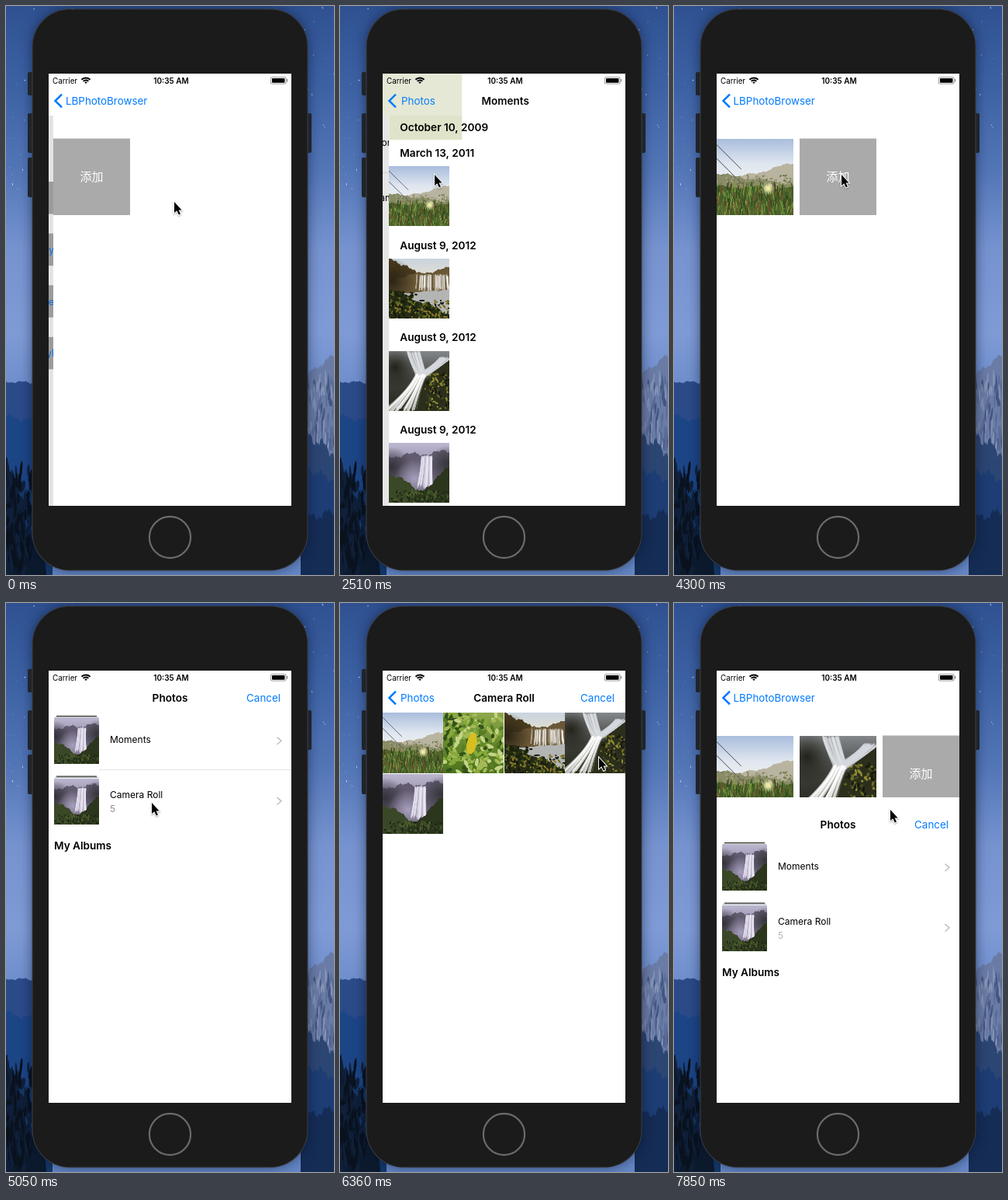
Animation, 423 px wide and 732 px high, one loop 8000 ms. Source, as an HTML page with a canvas:

```html
<!DOCTYPE html>
<html lang="en">
<head>
<meta charset="utf-8">
<title>Photo picker</title>
<style>
  html, body { margin: 0; width: 100%; height: 100%; overflow: hidden; background: #2f5191; }
  canvas { display: block; }
</style>
</head>
<body>
<canvas id="stage" width="423" height="732"></canvas>
<script>
// All animation times below are counted in beats: the screen refreshes once per beat.
const LOOP = 8000, BEAT = 148, LAST_BEAT = 53;
const LEFT = 55, TOP = 87, WIDTH = 313, HEIGHT = 556, NAV_BOTTOM = 141;
const BLUE = '#007aff';
const ctx = document.getElementById('stage').getContext('2d');

const VISITS = [
  { up: 8, rise: 231, push: 15, page: drawMoments, title: 'Moments', down: 21 },
  { up: 30, rise: 285, push: 37, page: drawRoll, title: 'Camera Roll', cancel: true, down: 44 },
  { up: 53, rise: 163 }
];
const POINTER_STOPS = [
  { at: 0, x: 217, y: 252 }, { at: 3, x: 116, y: 236 }, { at: 11, x: 122, y: 242 },
  { at: 14, x: 122, y: 217 }, { at: 23, x: 266, y: 213 }, { at: 27, x: 216, y: 217 },
  { at: 34, x: 188, y: 257 }, { at: 43, x: 334, y: 199 }, { at: 53, x: 279, y: 266 }
];

// Spring-like settling: a quarter of the distance is left after each beat.
function settle(beat, start, distance) {
  const rest = distance * .25 ** (beat - start);
  return rest < 1.2 ? 0 : rest;
}

const mix = (a, b, k) => a + (b - a) * k;

function seeded(seed) {
  return () => (seed = (seed * 16807) % 2147483647) / 2147483647;
}

// Scenery is painted on a 100 by 100 field.
function makePainter(c, seed) {
  const random = seeded(seed);
  const pick = list => list[random() * list.length | 0];
  return {
    sky(...colors) {
      const g = c.createLinearGradient(0, 0, 0, 100);
      colors.forEach((color, i) => g.addColorStop(i / (colors.length - 1), color));
      c.fillStyle = g;
      c.fillRect(0, 0, 100, 100);
    },
    ridge(color, left, right, rough) {
      const phase = random() * 6;
      c.fillStyle = color;
      c.beginPath();
      c.moveTo(0, 100);
      for (let x = 0; x <= 100; x += 2) {
        const bump = Math.sin(x * .13 + phase) + Math.sin(x * .4 + phase * 2) / 2 + Math.sin(x + phase) / 3;
        c.lineTo(x, mix(left, right, x / 100) + rough * bump);
      }
      c.lineTo(100, 100);
      c.fill();
    },
    glow(color, x, y, r) {
      const g = c.createRadialGradient(x, y, 0, x, y, r);
      g.addColorStop(0, color);
      g.addColorStop(1, color + '00');
      c.fillStyle = g;
      c.fillRect(0, 0, 100, 100);
    },
    speckle(colors, count, x, y, w, h, size) {
      for (let i = 0; i < count; i++) {
        c.fillStyle = pick(colors);
        c.beginPath();
        c.ellipse(x + random() * w, y + random() * h, size * (.4 + random()), size * .5, random() * 3, 0, 7);
        c.fill();
      }
    },
    blades(colors, count, y, h, length) {
      c.lineWidth = 1;
      for (let i = 0; i < count; i++) {
        const x = random() * 104 - 2, foot = y + (i / count) * h;
        c.strokeStyle = pick(colors);
        c.beginPath();
        c.moveTo(x, foot + length);
        c.lineTo(x + random() * 8 - 4, foot);
        c.stroke();
      }
    },
    water(color, x1, y1, w1, x2, y2, w2) {
      c.lineWidth = 2;
      for (let i = 0; i < 50; i++) {
        const k = random() - .5;
        c.strokeStyle = color;
        c.globalAlpha = .15 + random() * .5;
        c.beginPath();
        c.moveTo(x1 + k * w1, y1 + random() * 4);
        c.quadraticCurveTo(mix(x1, x2, .3) + k * w1, mix(y1, y2, .4), x2 + k * w2, y2 - random() * 8);
        c.stroke();
      }
      c.globalAlpha = 1;
    }
  };
}

function makePhoto(seed, paint) {
  const photo = document.createElement('canvas');
  photo.width = photo.height = 200;
  const c = photo.getContext('2d');
  c.scale(2, 2);
  paint(makePainter(c, seed), c);
  return photo;
}

const grass = makePhoto(11, (p, c) => {
  p.sky('#a9bddd', '#e0e7f0', '#f4f4f2', '#f4f4f2');
  p.ridge('#b9b4a0', 58, 32, 1.5);
  p.ridge('#8b8d68', 46, 60, 1.5);
  p.speckle(['#6f7a4a', '#a8a587', '#888a63'], 120, 0, 48, 100, 16, 2);
  p.ridge('#4b652b', 63, 64, 1.5);
  p.blades(['#86a048', '#2f471c', '#7c4a34', '#5c7c34', '#41592a'], 320, 56, 40, 12);
  c.strokeStyle = '#55585c';
  c.lineWidth = .8;
  for (const y of [8, 26]) {
    c.beginPath();
    c.moveTo(0, y);
    c.lineTo(32, y + 32);
    c.stroke();
  }
  p.glow('#fffbd0', 67, 65, 9);
  p.glow('#f4ee9c', 67, 65, 6);
});

const leaves = makePhoto(23, (p, c) => {
  p.sky('#8fa84d', '#668b2d', '#4d711f');
  p.speckle(['#86aa3a', '#33521a', '#c3d486', '#587d25', '#a4ba56'], 200, 0, 0, 100, 100, 6);
  c.fillStyle = '#d7bf22';
  c.beginPath();
  c.ellipse(47, 51, 8, 18, .2, 0, 7);
  c.fill();
});

const sunset = makePhoto(37, p => {
  p.sky('#c9d4df', '#f3e6c8', '#f3e6c8');
  p.ridge('#4b3c20', -4, 60, 3);
  p.ridge('#6a5736', 34, 16, 2);
  p.glow('#2a2413', 5, 38, 38);
  p.water('#ffffff', 72, 26, 52, 72, 56, 56);
  p.ridge('#b3b5b4', 60, 52, .6);
  p.ridge('#262d14', 50, 92, 3);
  p.speckle(['#6f7020', '#14180c', '#414d1c', '#8b7530', '#1d2411'], 150, 0, 70, 100, 32, 3);
  p.speckle(['#5d651f', '#1a200f'], 40, 0, 56, 45, 20, 3);
});

const stream = makePhoto(51, p => {
  p.sky('#85888c', '#3d3f39', '#25271b');
  p.glow('#23231a', 10, 28, 36);
  p.ridge('#2c2f1b', 96, 14, 3);
  p.speckle(['#6d6c22', '#181a10', '#454a20', '#8e8a35', '#2b2e1c'], 130, 58, 32, 44, 70, 3);
  p.water('#dfe2e6', 40, 0, 22, 54, 46, 16);
  p.water('#d5d9de', 92, 10, 16, 56, 44, 12);
  p.water('#ffffff', 53, 38, 18, 18, 104, 58);
});

const purple = makePhoto(83, p => {
  p.sky('#bdb7d0', '#8d85a2', '#6b6478');
  p.ridge('#635c70', 22, 14, 3);
  p.glow('#35323c', 4, 40, 34);
  p.glow('#35363a', 96, 34, 30);
  p.glow('#a79fbc', 42, 60, 34);
  p.water('#ece7f6', 63, 20, 18, 60, 76, 26);
  p.ridge('#3a4827', 50, 104, 3);
  p.ridge('#2b361d', 126, 40, 3);
  p.speckle(['#4d5e2d', '#1f2815', '#394926'], 110, 0, 80, 100, 20, 3);
});

function rect(color, x, y, w, h) {
  ctx.fillStyle = color;
  ctx.fillRect(x, y, w, h);
}

function rounded(color, x, y, w, h, r) {
  ctx.fillStyle = color;
  ctx.beginPath();
  ctx.roundRect(x, y, w, h, r);
  ctx.fill();
}

// y is the middle of the capitals.
function text(str, x, y, size, { color = '#000', weight = 400, align = 'left' } = {}) {
  ctx.font = `${weight} ${size}px Inter, "Noto Sans CJK SC", "Noto Sans CJK", sans-serif`;
  ctx.fillStyle = color;
  ctx.textAlign = align;
  ctx.fillText(str, x, y + size * .36);
}

const heading = (str, x, y, align) => text(str, x, y, 13.6, { weight: 600, align });

function chevron(x, y, dx, dy, color, width) {
  ctx.strokeStyle = color;
  ctx.lineWidth = width;
  ctx.beginPath();
  ctx.moveTo(x + dx, y - dy);
  ctx.lineTo(x, y);
  ctx.lineTo(x + dx, y + dy);
  ctx.stroke();
}

function clipTo(x, y, w, h, draw) {
  ctx.save();
  ctx.beginPath();
  ctx.rect(x, y, w, h);
  ctx.clip();
  draw();
  ctx.restore();
}

function shifted(dx, dy, draw) {
  ctx.save();
  ctx.translate(dx, dy);
  draw();
  ctx.restore();
}

function scenery(x, y, w, h, seed, paint) {
  shifted(x, y, () => {
    ctx.scale(w / 100, h / 100);
    paint(makePainter(ctx, seed));
  });
}

function drawDesktop() {
  scenery(0, 0, 423, 732, 97, p => {
    p.sky('#2f5191', '#3d62a4', '#5275b6', '#7693d0', '#7f9bd6', '#6587c6', '#6587c6', '#6587c6');
    p.speckle(['#dfe8ff', '#8ca6d8', '#5f80bd'], 200, 0, 0, 100, 34, .18);
  });
  scenery(0, 470, 60, 262, 5, p => {
    p.ridge('#2b4a88', 5, 6, .5);
    p.ridge('#1c4586', 22, 26, 1);
    p.ridge('#143868', 50, 70, 2);
    p.ridge('#0c1a2e', 46, 104, 4);
    p.speckle(['#0a121e', '#10203a'], 120, 0, 48, 56, 52, 5);
  });
  scenery(380, 440, 43, 292, 19, p => {
    p.ridge('#6a7ca6', 14, 3, .8);
    p.speckle(['#8494b6', '#43557f', '#596b97'], 90, 15, 14, 85, 30, 4);
    p.ridge('#2c4673', 36, 46, 2);
    p.ridge('#1d3d74', 52, 58, 1.5);
    p.ridge('#152c54', 76, 72, 1.5);
  });
}

function drawPhone() {
  ctx.save();
  ctx.shadowColor = 'rgba(5,15,40,.55)';
  ctx.shadowBlur = 16;
  rounded('#1c1c1c', 34, 4, 355, 722, 48);
  ctx.restore();
  rounded('#20242a', 28, 85, 7, 30, 2);
  rounded('#20242a', 28, 195, 7, 51, 2);
  for (const x of [28, 387]) rounded('#20242a', x, 138, 7, 51, 2);
  rounded('#3a3f45', 33.5, 3.5, 356, 723, 48.5);
  rounded('#1b1b1b', 34.5, 4.5, 354, 721, 47.5);
  ctx.strokeStyle = '#6b6b6b';
  ctx.lineWidth = 2.2;
  ctx.beginPath();
  ctx.arc(211.5, 683.5, 26.6, 0, 7);
  ctx.stroke();
}

function drawStatus() {
  text('Carrier', 60, 96, 9.8);
  text('10:35 AM', 213, 96, 10, { weight: 600, align: 'center' });
  ctx.strokeStyle = '#000';
  ctx.lineWidth = 2;
  for (const r of [1.3, 4.5, 7.6]) {
    ctx.beginPath();
    ctx.arc(103, 100, r, -Math.PI * .76, -Math.PI * .24);
    ctx.stroke();
  }
  rounded('#888', 341, 91.2, 20.5, 9.4, 2.4);
  rounded('#fff', 341.8, 92, 18.9, 7.8, 1.8);
  rounded('#000', 343, 93, 16.5, 5.8, 1);
  rect('#888', 362, 94, 1.2, 3.5);
}

function drawBack(label, x) {
  chevron(63.5, 122, 8.5, 8.3, BLUE, 2.5);
  text(label, x, 122, 13.4, { color: BLUE });
}

// The home page, with the page it slid over still showing at the left.
function drawHome(beat) {
  const off = settle(beat, 0, 6);
  rect('#fff', LEFT, TOP, WIDTH, HEIGHT);
  clipTo(LEFT, NAV_BOTTOM, off, HEIGHT, () => {
    rect('#e4e4e4', LEFT, NAV_BOTTOM, off, HEIGHT);
    ['', 'ty', 'e', 'yl'].forEach((label, i) => {
      const y = 226 + i * 66.6;
      rect('#9c9c9c', LEFT, y, off, 41.5);
      text(label, 62, y + 21, 12.5, { color: '#0a6fe0', align: 'right' });
    });
  });
  drawBack('LBPhotoBrowser', 76.5 + off / 12);
  const picked = [grass, stream].slice(0, VISITS.filter(v => beat >= v.down + 4).length);
  picked.forEach((photo, i) => ctx.drawImage(photo, LEFT + i * 107, 170.5, 99, 98.5));
  const x = LEFT + picked.length * 107 + off;
  rect('#aaa', x, 170.5, 99, 98.5);
  text('添加', x + 49.5, 220, 15, { color: '#fff', align: 'center' });
}

function drawAlbums(settled) {
  rect('#fff', LEFT, NAV_BOTTOM, WIDTH, HEIGHT);
  for (const y of [145, 222.5]) {
    rect('#25291f', 65, y, 52, 1.2);
    rect('#8b93a0', 63, y + 1.8, 56, .8);
    ctx.drawImage(purple, 61.5, y + 3, 58.5, 59);
    chevron(355, y + 32.3, -5.5, 4.7, '#c2c2c7', 1.6);
  }
  if (settled) rect('#e4e4e6', 120, 214, 248, 1);
  text('Moments', 134, 176, 12);
  text('Camera Roll', 134, 247, 12);
  text('5', 134, 264.5, 12, { color: settled ? '#8e8e93' : '#b4b4b8' });
  heading('My Albums', 62, 312);
}

function drawMoments() {
  rect('#fff', LEFT, TOP, WIDTH, HEIGHT);
  // Bars are translucent over the leaf photo scrolled beneath them.
  rect('#e5e8d5', 0, TOP, 149, NAV_BOTTOM - TOP);
  rect('#dfe3c9', LEFT, NAV_BOTTOM, 94, 31);
  heading('October 10, 2009', 69, 156);
  [grass, sunset, stream, purple].forEach((photo, i) => {
    const y = 189 + i * 118.8;
    heading(i ? 'August 9, 2012' : 'March 13, 2011', 69, y);
    ctx.drawImage(photo, LEFT, y + 17, 78, 77);
  });
}

function drawRoll() {
  rect('#fff', LEFT, NAV_BOTTOM, WIDTH, HEIGHT);
  [grass, leaves, sunset, stream, purple].forEach((photo, i) =>
    ctx.drawImage(photo, LEFT + i % 4 * 78.4, NAV_BOTTOM + (i >> 2) * 78.6, 77.8, 77.8));
}

function drawPushed(visit, off) {
  const progress = 1 - off / WIDTH;
  rect(`rgba(0,0,0,${.1 * progress})`, LEFT, NAV_BOTTOM, off, HEIGHT);
  shifted(off, 0, visit.page);
  ctx.globalAlpha = progress;
  drawBack('Photos', 78 + off * .12);
  heading(visit.title, 211.5 + off * .2, 122, 'center');
  ctx.globalAlpha = 1;
}

function drawSheet(beat, visit) {
  const lift = settle(beat, visit.up, visit.rise);
  const pushed = beat >= visit.push;
  const off = pushed ? settle(beat, visit.push, 133) : WIDTH;
  const drop = beat >= visit.down ? HEIGHT - 130 * .125 ** (beat - visit.down) : lift;
  shifted(0, drop, () => {
    rect('#fff', LEFT, TOP, WIDTH, HEIGHT);
    if (off) shifted(off * .3 - WIDTH * .3, 0, () => drawAlbums(!lift));
    if (pushed) drawPushed(visit, off);
    else heading('Photos', 211.5, 122, 'center');
    if (lift && lift < 20) rect('#cfcfd2', LEFT, 140, WIDTH, 1);
    if (!pushed || visit.cancel) text('Cancel', 354, 122, 13.4, { color: BLUE, align: 'right' });
  });
}

// The pointer rests, then glides during the three beats before each stop.
function drawPointer(beat) {
  const next = POINTER_STOPS.findIndex(stop => stop.at >= beat);
  const to = POINTER_STOPS[next], from = POINTER_STOPS[Math.max(0, next - 1)];
  const k = Math.max(0, 1 - (to.at - beat) / 3);
  shifted(mix(from.x, to.x, k), mix(from.y, to.y, k), () => {
    const arrow = new Path2D('M0 0V14L3.3 11.2L5.8 16.6L8 15.6L5.6 10.4H9.6Z');
    ctx.shadowColor = 'rgba(0,0,0,.35)';
    ctx.shadowBlur = 2;
    ctx.shadowOffsetY = 1;
    ctx.strokeStyle = '#fff';
    ctx.lineWidth = 2;
    ctx.stroke(arrow);
    ctx.shadowColor = 'transparent';
    ctx.fillStyle = '#000';
    ctx.fill(arrow);
  });
}

function render(beat) {
  drawDesktop();
  drawPhone();
  clipTo(LEFT, TOP, WIDTH, HEIGHT, () => {
    drawHome(beat);
    const visit = VISITS.findLast(v => beat >= v.up);
    if (visit) drawSheet(beat, visit);
    drawStatus();
  });
  drawPointer(beat);
}

function loop() {
  const now = performance.now() % LOOP;
  render(Math.min(LAST_BEAT, Math.floor((now + 10) / BEAT)));
  requestAnimationFrame(loop);
}
loop();
</script>
</body>
</html>
```
